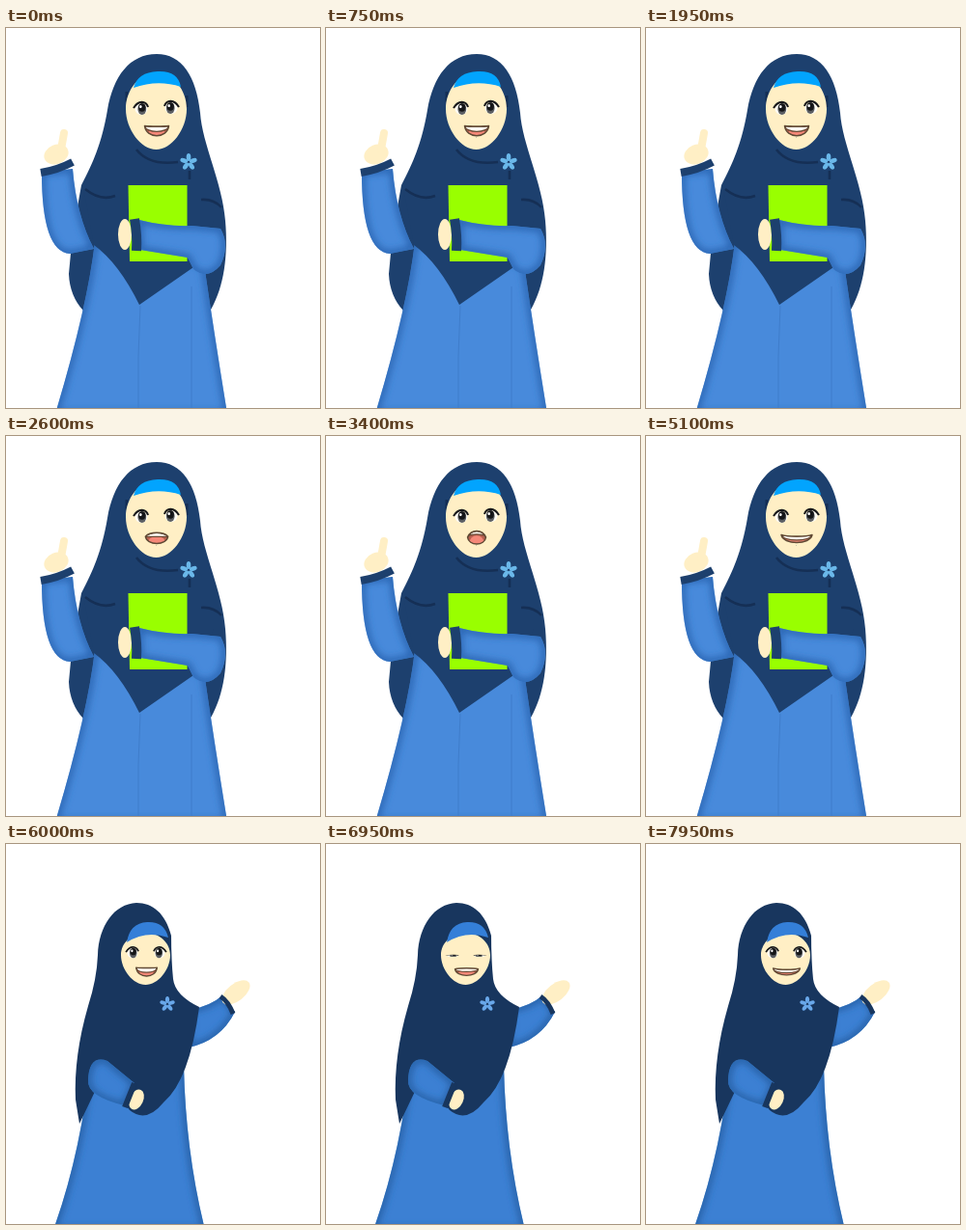
These frames come from a looping animation (325x394 px, 8 s). An HTML page:

```html
<!DOCTYPE html>
<html lang="en">
<head>
<meta charset="utf-8">
<title>Talking character</title>
<style>
html, body { margin: 0; width: 100%; height: 100%; overflow: hidden; background: #fff; }
svg { display: block; width: 100%; height: 100%; }
</style>
</head>
<body>
<svg id="stage" viewBox="0 0 325 394">
  <filter id="soft" x="-50%" y="-50%" width="200%" height="200%"><feGaussianBlur stdDeviation="3.5"/></filter>
</svg>
<script>
const NS = 'http://www.w3.org/2000/svg';
const LOOP = 8000, STEP = 50, POSE_CHANGE = 5250;
const SKIN = '#ffefc5';
const stage = document.getElementById('stage');
let clips = 0;

function add(parent, tag, attrs = {}) {
  const el = document.createElementNS(NS, tag);
  for (const name in attrs) el.setAttribute(name, attrs[name]);
  return parent.appendChild(el);
}
const shape = (g, fill, d) => add(g, 'path', { d, fill });
const line = (g, stroke, width, d, more = {}) =>
  add(g, 'path', { d, stroke, 'stroke-width': width, fill: 'none', ...more });
const oval = (g, fill, cx, cy, rx, ry, turn = 0) =>
  add(g, 'ellipse', { fill, rx, ry, transform: `translate(${cx} ${cy}) rotate(${turn})` });

function clipped(g) {
  const id = 'clip' + clips++;
  const path = add(add(g, 'clipPath', { id }), 'path');
  return { path, inside: add(g, 'g', { 'clip-path': `url(#${id})` }) };
}

// Cloth with a soft darker rim that follows its own outline.
function cloth(g, fill, rim, d) {
  shape(g, fill, d);
  const { path, inside } = clipped(g);
  path.setAttribute('d', d);
  line(inside, rim, 7, d, { filter: 'url(#soft)' });
}

function face(g, cx, top, mid, bottom, w) {
  const side = s => {
    const x = cx + s * w;
    return `M${cx} ${top}C${cx + s * w * .55} ${top} ${x} ${top + (mid - top) * .45} ${x} ${mid}` +
      `C${x} ${(mid + bottom) / 2} ${cx + s * w * .5} ${bottom} ${cx} ${bottom}`;
  };
  shape(g, SKIN, side(-1) + side(1));
}

function flower(g, x, y, r, color) {
  for (let i = 0; i < 5; i++)
    add(g, 'ellipse', { cy: -r * .56, rx: r * .26, ry: r * .44, fill: color, transform: `translate(${x} ${y}) rotate(${i * 72})` });
}

function eye(g, x, y, scale, side) {
  const lid = add(add(g, 'g', { transform: `translate(${x} ${y}) scale(${scale * side} ${scale})` }), 'g');
  oval(lid, '#fffdf5', 0, 0, 6.5, 6);
  oval(lid, '#5c5f63', .8, 0, 4.4, 6);
  oval(lid, '#141517', .8, -1.5, 3.6, 4.2);
  oval(lid, '#fff', .8 - side * 1.5, -2.5, 1.3, 1.5);
  line(lid, '#17181a', 2, 'M-8-1Q-4-8 2-7Q6-6 7-2');
  return lid;
}

function mouth(g, x, y, scale) {
  const m = add(g, 'g', { transform: `translate(${x} ${y}) scale(${scale})` });
  const { path, inside } = clipped(m);
  shape(inside, '#b5604f', 'M-20-10H20V30H-20Z');
  const tongue = oval(inside, '#f58878', 0, 0, 1, 1);
  const teeth = add(inside, 'path', { fill: '#fffdf7', stroke: '#6b4a35', 'stroke-width': 1.3 });
  const lips = line(m, '#604a35', 1.5, '', { 'stroke-linejoin': 'round' });
  return ({ w, corner, top, bottom, bite }) => {
    const bow = v => corner + (v - corner) * 4 / 3;
    const curve = v => `M${-w} ${corner}C${-.6 * w} ${bow(top)} ${.6 * w} ${bow(top)} ${w} ${corner}` +
      `C${.88 * w} ${bow(v)} ${-.88 * w} ${bow(v)} ${-w} ${corner}Z`;
    for (const el of [path, lips]) el.setAttribute('d', curve(bottom));
    teeth.setAttribute('d', curve(top + (bottom - top) * bite));
    tongue.setAttribute('transform', `translate(0 ${bottom - 1}) scale(${w * .8} ${(bottom - top) * .58})`);
  };
}

function thumbPose() {
  const g = add(stage, 'g'), navy = '#1d406e', dark = '#152f55', blue = '#488adb', rim = '#2b66b3';
  shape(g, navy, 'M156 27C128 27 111 50 105 85S90 140 78 163Q68 215 65 255Q66 278 80 293L100 250L205 292H212' +
    'C226 268 230 235 227 200C224 160 203 120 201 88C197 50 182 27 156 27Z');
  cloth(g, blue, rim, 'M92 222Q84 290 51 400H229Q216 320 205 245Z');
  line(g, '#3f7dcb', 1, 'M139 288Q136 340 137 394M192 268V394');
  shape(g, navy, 'M80 165L91 225Q117 244 138 287L197 246L215 200V150H95Z');
  line(g, dark, 2.6, 'M82 167Q98 180 113 174M202 178Q215 177 223 186M135 126Q148 143 178 139M190 148V157');
  line(g, dark, 3, 'M125 66V77M187 70V82');

  cloth(g, blue, rim, 'M37 150Q37 232 66 234L91 229Q73 195 69 146Z');
  oval(g, SKIN, 52, 131, 13, 10, -22);
  line(g, SKIN, 8, 'M57 126L60 109', { 'stroke-linecap': 'round' });
  line(g, navy, 8, 'M36 150Q54 147 69 139');

  shape(g, '#99ff00', 'M126.5 163H187.5V242H128Z');
  cloth(g, blue, rim, 'M138 199Q165 206 192 205L222 208Q232 225 222 246Q208 262 194 250L188 238L139 230Z');
  oval(g, SKIN, 123, 214, 7, 16);
  line(g, navy, 10, 'M133 198Q136 215 135 231');

  face(g, 155.5, 47, 84, 126, 31.5);
  shape(g, '#02a4fe', 'M132 62Q136 46 157 45T181 61Q157 53 132 62Z');
  flower(g, 189, 139, 9, '#6ab8ea');
  return { g, eyes: [eye(g, 140, 84, 1, 1), eye(g, 171, 83, 1, -1)], talk: mouth(g, 156, 102, 1) };
}

function pointPose() {
  const g = add(stage, 'g'), navy = '#18365e', blue = '#3c80d3', rim = '#2860a6';
  cloth(g, blue, rim, 'M190 172Q212 168 224 157L237 174Q222 204 189 211Z');
  oval(g, SKIN, 238, 154, 17, 9, -38);
  line(g, navy, 5, 'M222 158Q230 163 235 176');
  cloth(g, blue, rim, 'M88 220Q78 320 49 400H206Q186 320 184 230Z');
  shape(g, navy, 'M135 61C112 62 96 85 95 115Q94 140 85 168Q70 220 72 265L76 290L100 240L128 276Q145 290 163 268' +
    'Q190 245 200 169Q175 157 173 140Q171 120 171 95C165 72 152 61 135 61Z');
  cloth(g, blue, rim, 'M85 245Q86 218 105 225L133 248L122 271Q84 262 85 245Z');
  oval(g, SKIN, 135, 265, 7, 11, 25);
  line(g, navy, 6, 'M133 248L123 273');

  face(g, 144.5, 92, 115, 146, 25.5);
  shape(g, '#347fd8', 'M125 102Q128 82 146 81T168 97Q145 89 125 102Z');
  flower(g, 167, 166, 8, '#69a8ea');
  return { g, eyes: [eye(g, 131, 113, .86, 1), eye(g, 159, 113, .86, -1)], talk: mouth(g, 145.5, 128.5, .87) };
}

const poses = [thumbPose(), pointPose()];

const smile = { w: 12.5, corner: -.5, top: 0, bottom: 9.8, bite: .55 };
const wide = { w: 16, corner: .4, top: 2, bottom: 8.5, bite: .6 };
const round = { w: 9.5, corner: 3, top: -3.5, bottom: 10, bite: .25 };
const speech = [smile, round, wide, wide, round, smile, round, round];
const SYLLABLE = 150, BLINK_EVERY = 2600, BLINK_AT = 1650, BLINK = 200;

function mouthAt(t) {
  const i = Math.floor(t / SYLLABLE), mix = t / SYLLABLE - i;
  const from = speech[i % speech.length], to = speech[(i + 1) % speech.length];
  return Object.fromEntries(Object.keys(from).map(k => [k, from[k] + (to[k] - from[k]) * mix]));
}

function eyeOpening(t) {
  const since = (t + BLINK_EVERY - BLINK_AT) % BLINK_EVERY;
  return since < BLINK ? 1 - .88 * Math.sin(Math.PI * (since + STEP) / (BLINK + STEP)) : 1;
}

function draw(now) {
  const t = Math.floor(now % LOOP / STEP) * STEP;
  const active = t < POSE_CHANGE ? 0 : 1;
  poses.forEach((pose, i) => pose.g.setAttribute('visibility', i === active ? 'visible' : 'hidden'));
  poses[active].talk(mouthAt(t - active * POSE_CHANGE));
  const open = eyeOpening(t);
  for (const lid of poses[active].eyes)
    lid.setAttribute('transform', `translate(0 ${4 * (1 - open)}) scale(1 ${open})`);
}

const start = performance.now();
function tick() {
  draw(performance.now() - start);
  requestAnimationFrame(tick);
}
tick();
</script>
</body>
</html>
```
